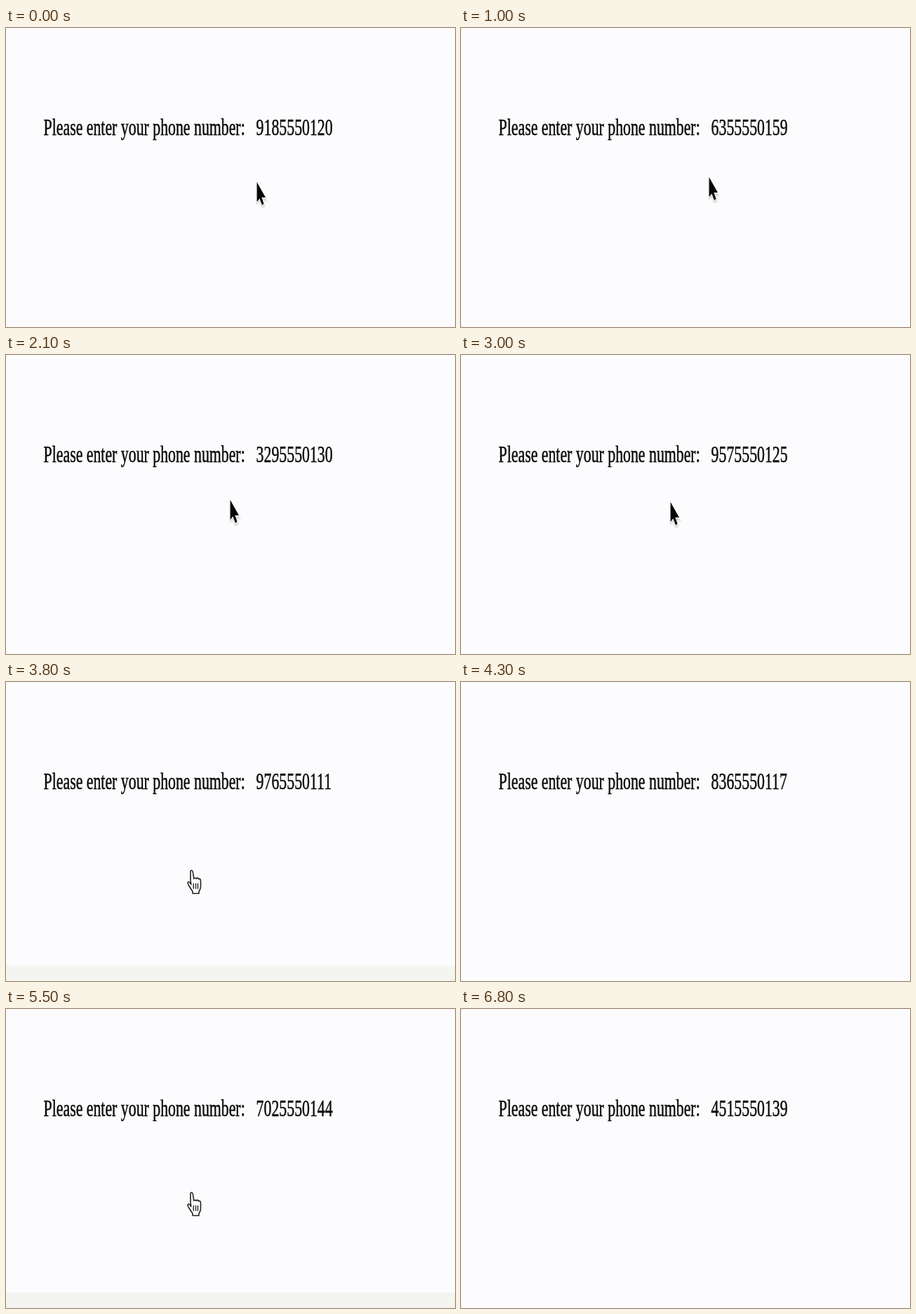
An HTML page for the animation above (6.9 s loop, 640 by 427 pixels).

```html
<!DOCTYPE html>
<html lang="en">
<head>
<meta charset="utf-8">
<title>Phone number</title>
<style>
  html, body { margin: 0; width: 100%; height: 100%; overflow: hidden; background: #fcfcfe; }
  svg { display: block; width: 100%; height: 100%; }
  text { font: 33px "Liberation Serif", "Times New Roman", serif; fill: #0c0c0c; stroke: #0c0c0c; stroke-width: .55; }
</style>
</head>
<body>
<svg viewBox="0 0 640 427" preserveAspectRatio="none">
  <rect width="640" height="427" fill="#fcfcfe"/>
  <rect id="band" y="405" width="640" height="22" fill="#f4f4f0"/>
  <!-- the whole page is squeezed sideways -->
  <text transform="translate(53.6 152.7) scale(.661 1)">Please enter your phone number:</text>
  <text id="number" transform="translate(356.6 152.7) scale(.661 1)"></text>
  <g id="arrow" stroke-linejoin="round">
    <path d="M0 3V32L4 29L8 37L12 35L10 27H15Z" fill="#bbb" stroke="#ddd" stroke-width="2" opacity=".6"/>
    <path d="M.6 0V28.5L4.4 23.5L8 33L10.6 31L7.4 22H13Z" fill="#060608" stroke="#fff" stroke-width="1.6" paint-order="stroke"/>
  </g>
  <g id="hand" stroke-linejoin="round" stroke-linecap="round">
    <path d="M1 14V2Q1 0 2.4 0Q4 0 4.3 2L5.8 12Q7 9.5 9 12Q11 9.5 12.5 12.5Q15.5 11 15.5 16V23Q15.5 27 13 30V33H4V30Q1 26 -1.5 21.5Q-4 17.5 -2 16.5Q-.5 16 1.8 20L1 14Z"
      fill="#fff" stroke="#222" stroke-width="1.6"/>
    <path d="M5.3 19V26M8.5 19V26M11.5 19V26" fill="none" stroke="#222" stroke-width="1.4"/>
  </g>
</svg>
<script>
const LOOP = 6900, STEP = 100;
const $ = id => document.getElementById(id);
const band = $("band"), number = $("number"), arrow = $("arrow"), hand = $("hand");

// arrow key points: time, x, y
const path = [[0, 357, 220], [1000, 353, 213], [2100, 319, 207], [3000, 298, 210]];

const between = (t, a, b) => t >= a && t < b;
const clamp = (v, lo, hi) => Math.min(hi, Math.max(lo, v));

function arrowAt(t) {
  const i = clamp(path.findLastIndex(p => p[0] <= t), 0, path.length - 2);
  const [t0, x0, y0] = path[i], [t1, x1, y1] = path[i + 1];
  const k = clamp((t - t0) / (t1 - t0), 0, 1);
  return [Math.round(x0 + (x1 - x0) * k), Math.round(y0 + (y1 - y0) * k)];
}

const handAt = t => [262, Math.round(262 + 8 * Math.sin((t - 5500) / 400))];

function random(seed) {
  const v = Math.sin(seed * 12.9898) * 43758.5453;
  return v - Math.floor(v);
}

function phone(n) {
  const area = 200 + Math.floor(random(n + 1) * 780);
  const line = 10 + Math.floor(random(n + 51) * 90);
  return `${area}55501${line}`;
}

function place(el, on, [x, y] = [0, 0]) {
  el.setAttribute("visibility", on ? "visible" : "hidden");
  el.setAttribute("transform", `translate(${x} ${y})`);
}

function draw(time) {
  const t = Math.floor(time % LOOP / STEP) * STEP;

  // a new number every 300 ms, then a long hold and one last draw
  const n = Math.floor((clamp(t, 200, 5500) - 200) / 300) + (t >= 6700);
  const text = phone(n);
  if (number.textContent !== text) number.textContent = text;

  const open = between(t, 3200, 3400) || between(t, 3800, 4200) || between(t, 5300, 5900);
  place(band, open);
  place(arrow, t < 3800 && !open, arrowAt(t));
  place(hand, open || between(t, 4500, 4800), handAt(t));
}

const start = performance.now();
function tick() {
  draw(performance.now() - start);
  requestAnimationFrame(tick);
}
tick();
</script>
</body>
</html>
```
